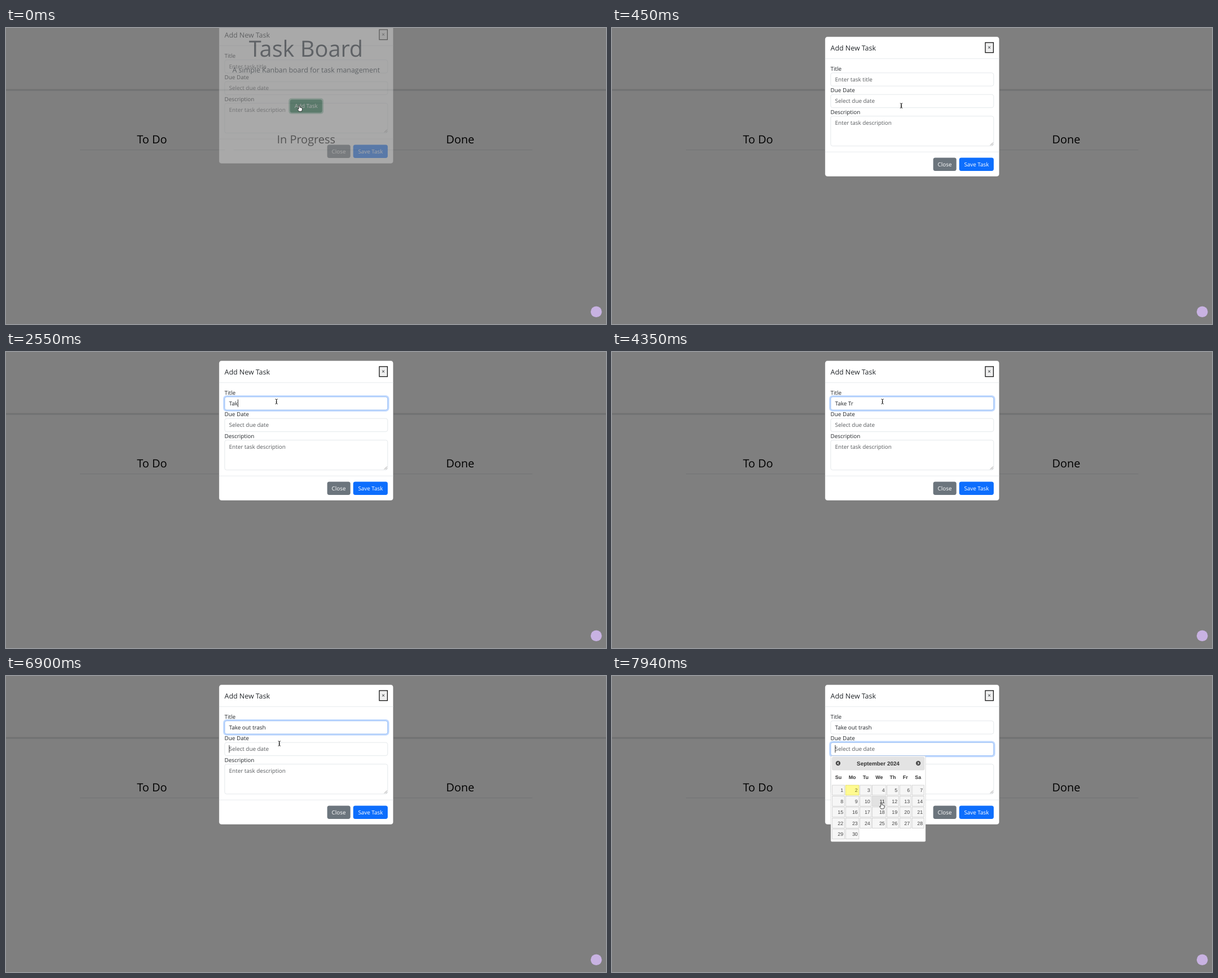
Write an HTML page that moves like this. It is 1064 by 526 pixels and loops after 8 s.

```html
<!DOCTYPE html>
<html lang="en">
<head>
<meta charset="utf-8">
<title>Task Board</title>
<style>
  html, body { margin: 0; width: 100%; height: 100%; overflow: hidden; background: #7f7f7f; }
  svg { display: block; width: 1064px; height: 526px; }
  text { font: 400 9.9px "Open Sans", "Noto Sans", sans-serif; fill: #212529; text-rendering: geometricPrecision; white-space: pre; }
  .mid { text-anchor: middle; }
  #page text { fill: #10151a; }
  #page .title { font-size: 39.7px; }
  #page .lead { font-size: 12.4px; }
  #page .lane { font-size: 19.9px; fill: #000; }
  #page .btn { fill: #808080; }
  #modal .heading { font-size: 12.4px; }
  #modal .hint { fill: #595c5f; }
  #modal .btn { fill: #fff; }
  #modal #typed { fill: #212529; }
  .field { fill: #fff; stroke: #dee2e6; stroke-width: .8; }
  .rule { stroke: #dee2e6; stroke-width: .7; }
  .ring { fill: none; stroke: #0d6efd; stroke-opacity: .25; stroke-width: 2.5; }
  .focus { fill: none; stroke: #86b7fe; stroke-width: .8; }
  #cal text { font: 8.9px "Liberation Sans", Arial, sans-serif; fill: #454545; }
  #cal .month { font-size: 9.9px; font-weight: 700; fill: #333; }
  #cal .week { font-weight: 700; fill: #333; }
  .day rect { fill: #f6f6f6; stroke: #c5c5c5; stroke-width: .7; }
  .today rect { fill: #fffa90; stroke: #dad55e; }
  #cal .today text { fill: #777620; }
  .hover rect { fill: #e2e2e2; stroke: #ccc; }
  #cal .hover text { fill: #2b2b2b; }
</style>
</head>
<body>
<svg viewBox="0 0 1064 526" xmlns="http://www.w3.org/2000/svg">
  <rect width="1064" height="526" fill="#7f7f7f"/>

  <g id="page">
    <rect y="108.6" width="1064" height="2.9" fill="#707172"/>
    <text class="title mid" x="532" y="51.3">Task Board</text>
    <text class="lead mid" x="532.3" y="79.3">A simple Kanban board for task management</text>
    <rect x="501.2" y="124.8" width="61.9" height="28" rx="5" fill="#4f665b"/>
    <rect x="503.6" y="127.2" width="57.1" height="23.2" rx="3.6" fill="#0b3a24"/>
    <text class="btn mid" x="532.2" y="142.4">Add Task</text>
    <g stroke="#6f7071" stroke-width=".8">
      <path d="M131 216.7H388M403.5 216.7H660.5M676 216.7H933.5"/>
    </g>
    <text class="lane mid" x="258.9" y="205">To Do</text>
    <text class="lane mid" x="532.2" y="205">In Progress</text>
    <text class="lane mid" x="805.4" y="205">Done</text>
  </g>

  <circle cx="1046.7" cy="504.3" r="9.8" fill="#c8b2e2"/>

  <g id="modal">
    <rect x="377.6" y="15.3" width="309.3" height="248.7" rx="4.6" fill="#fff" stroke="#6c6c6c" stroke-width=".6"/>
    <text class="heading" x="387.6" y="39.5">Add New Task</text>
    <rect x="662" y="25.9" width="14.4" height="17.8" fill="#efefef" stroke="#111" stroke-width="1.3"/>
    <text class="mid" x="669.2" y="38.2">×</text>
    <path class="rule" d="M377.9 54.4H686.6M377.9 220.2H686.6"/>

    <text x="387.6" y="75.9">Title</text>
    <rect class="field" x="387.8" y="79.7" width="289" height="23.4" rx="3.5"/>
    <text class="hint" id="hint" x="395.6" y="94.9">Enter task title</text>
    <text id="typed" x="395.6" y="94.9"></text>

    <text x="387.6" y="114.3">Due Date</text>
    <rect class="field" x="387.8" y="118.2" width="289" height="23.4" rx="3.5"/>
    <text class="hint" x="395.6" y="133.4">Select due date</text>

    <text x="387.6" y="152.9">Description</text>
    <rect class="field" x="387.8" y="156.6" width="289" height="53.1" rx="3.5"/>
    <text class="hint" x="395.6" y="172">Enter task description</text>
    <path d="M670.8 208.6L675.8 203.6M673.6 208.6L675.8 206.4" stroke="#666" stroke-width=".7"/>

    <rect x="569.6" y="230.4" width="41.1" height="23.5" rx="3.6" fill="#6c757d"/>
    <text class="btn mid" x="590.1" y="245.6">Close</text>
    <rect x="615.7" y="230.4" width="61.2" height="23.5" rx="3.6" fill="#0d6efd"/>
    <text class="btn mid" x="646.4" y="245.6">Save Task</text>

    <g id="focus">
      <rect class="ring" x="386.3" y="78.2" width="292" height="26.4" rx="4.8"/>
      <rect class="focus" x="387.8" y="79.7" width="289" height="23.4" rx="3.5"/>
    </g>
    <rect id="caret" y="84.3" width=".8" height="13.5" fill="#000"/>
  </g>

  <g id="cal">
    <rect x="388.1" y="142" width="167.9" height="152.3" rx="1.8" fill="#fff" stroke="#c5c5c5" stroke-width=".6"/>
    <rect x="390.3" y="144.1" width="163.5" height="23" rx="1.8" fill="#e3e3e3" stroke="#d5d5d5" stroke-width=".6"/>
    <text class="month mid" x="472" y="158.9">September 2024</text>
    <circle cx="400.9" cy="155" r="4.2" fill="#4d4d4d"/>
    <circle cx="543.1" cy="155" r="4.2" fill="#4d4d4d"/>
    <path d="M401.8 153.2L399.9 155L401.8 156.8M542.3 153.2L544.2 155L542.3 156.8" fill="none" stroke="#fff" stroke-width="1.1"/>
  </g>

  <g id="cursor">
    <path id="arrow" d="M0 0V9.2L2.1 7.3L3.5 10.5L5.2 9.8L3.8 6.7H6.6Z" fill="#000" stroke="#fff" stroke-width=".7"/>
    <path id="beam" d="M-2.2 -4.3Q0 -4.3 0 -3V3Q0 4.3 -2.2 4.3M2.2 -4.3Q0 -4.3 0 -3V3Q0 4.3 2.2 4.3M-1 .9H1" fill="none" stroke="#111" stroke-width=".9"/>
    <path id="hand" d="M-1 .9Q0 -.6 1 .9V4.1Q2 3.3 2.6 4.4Q3.6 3.8 4.1 4.9Q5.4 4.5 5.4 6V8Q5 9.6 4.2 11H-.6Q-1.4 9.2 -3.2 7.2Q-3.6 5.6 -1 7Z" fill="#fff" stroke="#111" stroke-width=".8" stroke-linejoin="round"/>
  </g>
</svg>

<script>
const LOOP = 8000;
const $ = id => document.getElementById(id);

// Each track is a list of [start time, ...values], held until the next entry.
const tracks = {
  modal: [[0, -23, .33], [150, -4.7, 1], [300, 0, 1]],
  // focused field: 0 none, 1 title, 2 due date
  focus: [[0, 0], [1200, 1], [7050, 2]],
  calendar: [[0, 0], [7050, .6], [7200, 1]],
  hover: [[0, 0], [7650, 12], [7800, 11]],
  text: [
    [0, ""], [2250, "T"], [2550, "Tak"], [2850, "Take"], [3000, "Take "],
    [3450, "Take T"], [3750, "Take Tr"], [3900, "Take Tra"], [4350, "Take Tr"],
    [4500, "Take T"], [4650, "Take "], [5250, "Take o"], [5400, "Take ou"],
    [5550, "Take out"], [5700, "Take out t"], [5850, "Take out tr"],
    [6000, "Take out tra"], [6300, "Take out tras"], [6450, "Take out trash"]
  ],
  // caret: 0 hidden, 1 in title, 2 in due date
  caret: [
    [0, 0], [1200, 1], [1650, 0], [2100, 1], [4350, 0], [4500, 1],
    [4950, 0], [5250, 1], [6900, 2], [7350, 0], [7800, 2]
  ],
  cursor: [
    [0, 520, 137.2, "hand"], [150, 520, 148.6, "arrow"], [300, 519, 147.5, "arrow"],
    [450, 513, 138, "beam"], [600, 503, 123, "beam"], [750, 491, 106, "arrow"],
    [900, 482, 93, "beam"], [1050, 479.6, 88, "beam"], [6600, 480.5, 95, "beam"],
    [6750, 483, 109, "arrow"], [6900, 484.7, 120, "beam"], [7200, 485, 125, "beam"],
    [7350, 488, 150, "arrow"], [7500, 492, 184, "arrow"], [7650, 491, 218, "hand"],
    [7800, 483, 229, "hand"], [7940, 477.6, 225, "hand"]
  ]
};

function at(name, t) {
  let hit;
  for (const key of tracks[name]) if (key[0] <= t) hit = key;
  return hit.slice(1);
}

function add(parent, tag, attrs, label) {
  const el = document.createElementNS("http://www.w3.org/2000/svg", tag);
  for (const k in attrs) el.setAttribute(k, attrs[k]);
  if (label !== undefined) el.textContent = label;
  return parent.appendChild(el);
}

const lefts = [390.7, 414.2, 439.7, 461.6, 487.7, 510.2, 532.2];
const rights = [412.3, 437.9, 459.9, 485.9, 508.3, 530.2, 553.2];
const days = [];

function buildCalendar() {
  const cal = $("cal");
  ["Su", "Mo", "Tu", "We", "Th", "Fr", "Sa"].forEach((name, i) =>
    add(cal, "text", { class: "week mid", x: (lefts[i] + rights[i]) / 2, y: 183.3 }, name));
  for (let d = 1; d <= 30; d++) {
    const col = (d - 1) % 7, y = 194 + 19.5 * Math.floor((d - 1) / 7);
    const g = add(cal, "g", { class: d === 2 ? "day today" : "day" });
    add(g, "rect", { x: lefts[col], y, width: rights[col] - lefts[col], height: 17.8 });
    add(g, "text", { x: rights[col] - 2.1, y: y + 12, "text-anchor": "end" }, d);
    days[d] = g;
  }
}

function draw(t) {
  const [dy, alpha] = at("modal", t);
  $("modal").setAttribute("transform", `translate(0 ${dy})`);
  $("modal").setAttribute("opacity", alpha);

  const [text] = at("text", t);
  $("typed").textContent = text;
  $("hint").setAttribute("opacity", text ? 0 : 1);

  const [field] = at("focus", t);
  $("focus").setAttribute("opacity", field ? 1 : 0);
  $("focus").setAttribute("transform", `translate(0 ${field === 2 ? 38.5 : 0})`);

  const [caret] = at("caret", t);
  const x = 395.5 + (caret === 1 && text ? $("typed").getComputedTextLength() : 0);
  $("caret").setAttribute("opacity", caret ? 1 : 0);
  $("caret").setAttribute("transform", `translate(${x} ${caret === 2 ? 38.5 : 0})`);

  $("cal").setAttribute("opacity", at("calendar", t)[0]);
  const [hover] = at("hover", t);
  days.forEach((g, d) => g.classList.toggle("hover", d === hover));

  const [cx, cy, shape] = at("cursor", t);
  $("cursor").setAttribute("transform", `translate(${cx} ${cy})`);
  for (const id of ["arrow", "beam", "hand"])
    $(id).setAttribute("display", id === shape ? "inline" : "none");
}

function tick() {
  draw(performance.now() % LOOP);
  requestAnimationFrame(tick);
}

buildCalendar();
tick();
</script>
</body>
</html>
```
